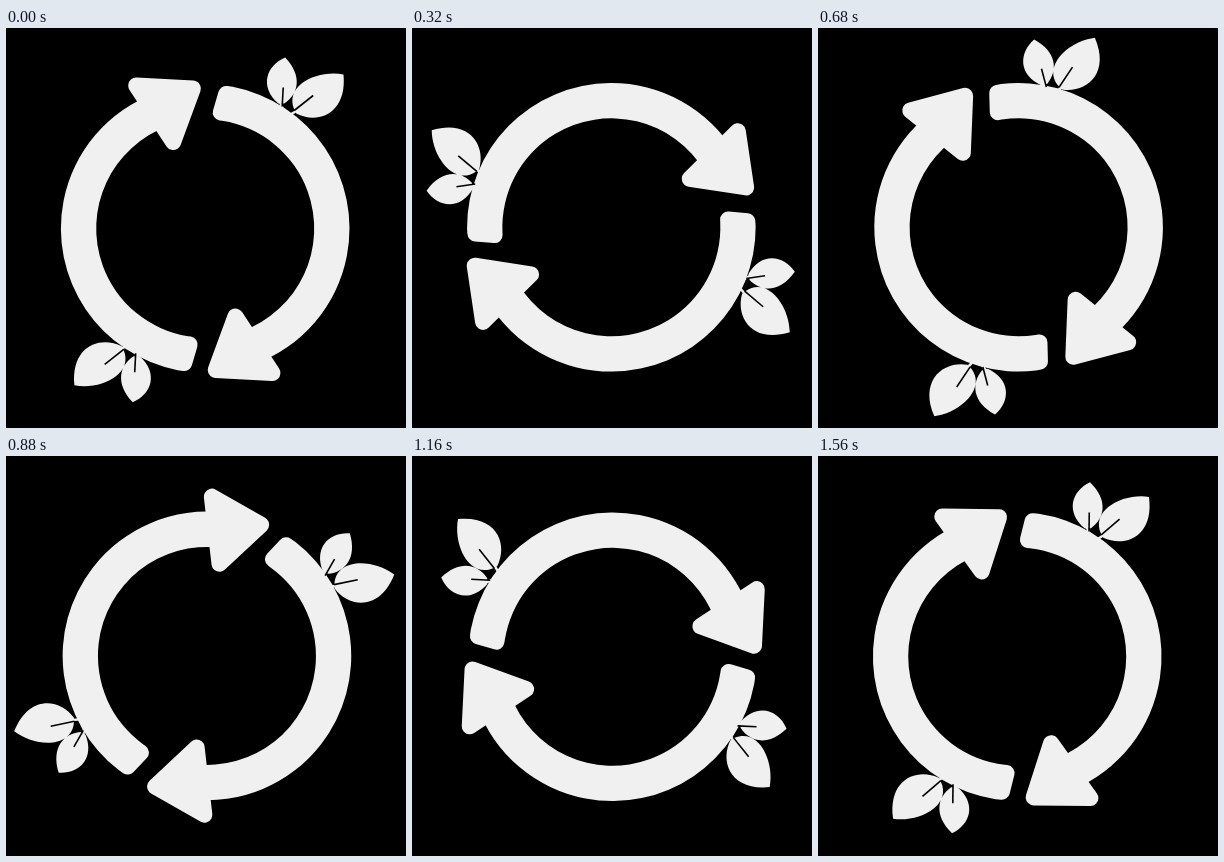
Recreate the animation shown at these times as an HTML page with a canvas. Size 400 by 400 pixels, loop 1600 ms.

```html
<!DOCTYPE html>
<html lang="en">
<head>
<meta charset="utf-8">
<title>Recycling arrows</title>
<style>
  html, body { margin: 0; width: 100%; height: 100%; overflow: hidden; background: #000; }
  canvas { display: block; }
</style>
</head>
<body>
<canvas id="stage" width="400" height="400"></canvas>
<script>
const ctx = document.getElementById('stage').getContext('2d');
const LOOP = 1600, STEP = 40;
const INK = '#f0f0f0', BACK = '#000';
const OUTER = 144.3, INNER = 109;
const rad = deg => deg * Math.PI / 180;

// Time in ms and clockwise turn in degrees; the spin slows slightly.
const spin = [[0, 0], [200, 50], [480, 116.6], [680, 162.1], [880, 206.7], [1160, 269.8], [1560, 357.6]];

function turnAt(time) {
  const i = Math.max(1, spin.findIndex(key => key[0] >= time));
  const [t0, a0] = spin[i - 1], [t1, a1] = spin[i];
  return a0 + (a1 - a0) * (time - t0) / (t1 - t0);
}

function line(color, width, x1, y1, x2, y2) {
  ctx.strokeStyle = color;
  ctx.lineWidth = width;
  ctx.beginPath();
  ctx.moveTo(x1, y1);
  ctx.lineTo(x2, y2);
  ctx.stroke();
}

function shifted([x, y], paint) {
  ctx.save();
  ctx.translate(x, y);
  paint();
  ctx.restore();
}

function band() {
  ctx.beginPath();
  ctx.arc(0, 0, OUTER, rad(11 - 90), rad(160 - 90));
  ctx.arc(0, 0, INNER, rad(160 - 90), rad(9 - 90), true);
  ctx.arcTo(5.3, -109.5, 15.3, -143.4, 8);
  ctx.arcTo(15.3, -143.4, 27.5, -141.6, 8);
  ctx.closePath();
  ctx.fill();
}

function arrowHead() {
  ctx.beginPath();
  ctx.moveTo(32, 86.5);
  ctx.lineTo(12.3, 140);
  ctx.lineTo(69, 143);
  ctx.closePath();
  ctx.fill();
  ctx.strokeStyle = INK;
  ctx.lineWidth = 16;
  ctx.stroke();
}

function leaves() {
  line(INK, 2.5, 75, -126, 80, -113);
  line(INK, 2.5, 92, -118, 82, -112);

  ctx.beginPath();
  ctx.moveTo(80, -171);
  ctx.bezierCurveTo(61, -163, 54, -142, 73, -125);
  ctx.lineTo(79, -125);
  ctx.bezierCurveTo(93, -134, 98, -152, 80, -171);
  ctx.moveTo(138.3, -154);
  ctx.bezierCurveTo(112, -159, 79, -143, 89, -119);
  ctx.lineTo(91, -115);
  ctx.bezierCurveTo(112, -104, 142, -114, 138.3, -154);
  ctx.fill();

  line(BACK, 1.6, 78, -141, 77, -122);
  line(BACK, 1.6, 108, -133, 89, -118);
}

function half(arrowShift, leafShift) {
  band();
  shifted(arrowShift, arrowHead);
  shifted(leafShift, leaves);
}

function draw(now) {
  const time = Math.floor(now % LOOP / STEP) * STEP;
  ctx.setTransform(1, 0, 0, 1, 0, 0);
  ctx.fillStyle = BACK;
  ctx.fillRect(0, 0, 400, 400);
  ctx.fillStyle = INK;
  ctx.lineJoin = 'round';
  ctx.translate(200, 200);
  ctx.rotate(rad(turnAt(time)));
  ctx.translate(-0.8, 0.5);
  half([-1.8, 1.5], [0, 0]);
  ctx.rotate(Math.PI);
  half([0, 0], [-7.5, -2.8]);
}

const start = performance.now();
function tick() {
  draw(performance.now() - start);
  requestAnimationFrame(tick);
}
tick();
</script>
</body>
</html>
```
